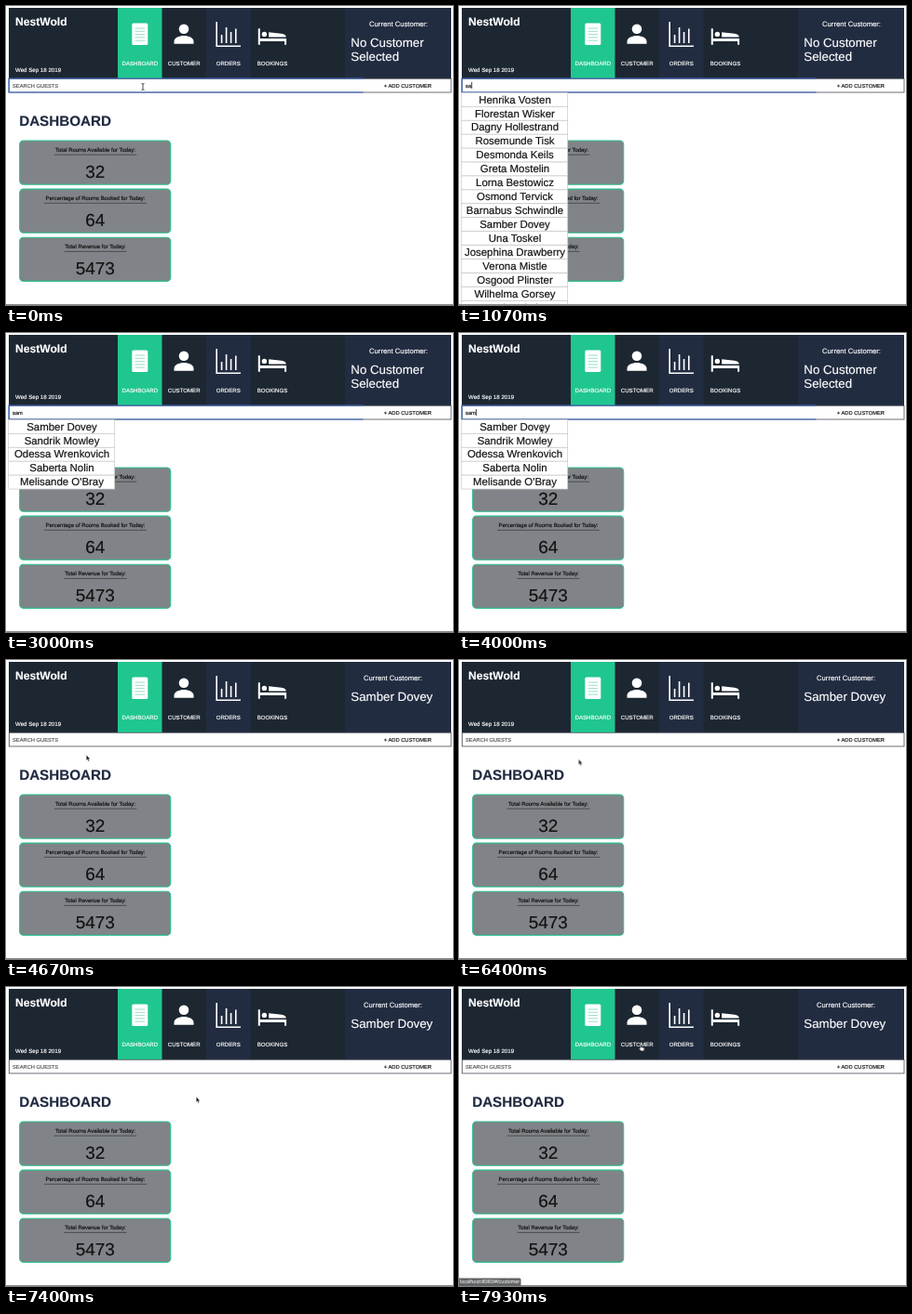
Recreate the animation shown at these times as an HTML page. Size 480 by 322 pixels, loop 8 s.

```html
<!DOCTYPE html>
<html lang="en">
<head>
<meta charset="utf-8">
<title>Hotel dashboard</title>
<style>
html, body { margin: 0; width: 100%; height: 100%; overflow: hidden; background: #fff; }
svg { display: block; width: 480px; height: 322px; color: #111; }
/* The thin stroke gives small type a slightly heavier weight */
text {
  font-family: "Liberation Sans", Arial, Helvetica, sans-serif;
  text-rendering: geometricPrecision;
  fill: currentColor; stroke: currentColor; stroke-width: .16px;
}
#header { color: #fff; }
.mid, .nav, .head, .row { text-anchor: middle; }
.nav { font-size: 6.1px; }
.field { font-size: 5.75px; }
.name { font-size: 13.3px; }
.head { font-size: 7.65px; }
.row { font-size: 11.45px; }

/* Hard switches */
.step { animation: 8s step-end infinite; }
.hint { animation-name: hint; color: #555; }
.ring { animation-name: ring; }
.t1 { animation-name: t1; }
.t2, .long { animation-name: t2; }
.t3, .short { animation-name: t3; }
.caret { animation-name: caret; }
.before { animation-name: before; }
.after { animation-name: after; }
.beam { animation-name: beam; }
.arrow { animation-name: arrow; }
.hand { animation-name: hand; }
.status { animation-name: status; color: #d4d4d4; }
@keyframes hint { 0% { opacity: 1 } 9.1% { opacity: 0 } 58.3%, 100% { opacity: 1 } }
@keyframes ring { 0% { opacity: 1 } 56.6%, 100% { opacity: 0 } }
@keyframes t1 { 0% { opacity: 0 } 9.1% { opacity: 1 } 13.3%, 100% { opacity: 0 } }
@keyframes t2 { 0% { opacity: 0 } 13.3% { opacity: 1 } 19.1%, 100% { opacity: 0 } }
@keyframes t3 { 0% { opacity: 0 } 19.1% { opacity: 1 } 58.3%, 100% { opacity: 0 } }
@keyframes caret {
  0% { opacity: 0; transform: translateX(7px) }
  3.35% { opacity: 1; transform: translateX(7px) }
  9.1% { opacity: 1; transform: translateX(10px) }
  13.3% { opacity: 1; transform: translateX(13.2px) }
  19.1% { opacity: 1; transform: translateX(17.9px) }
  24.95% { opacity: 0; transform: translateX(17.9px) }
  31.6% { opacity: 1; transform: translateX(17.9px) }
  37.45% { opacity: 0; transform: translateX(17.9px) }
  44.1% { opacity: 1; transform: translateX(17.9px) }
  50.3%, 100% { opacity: 0; transform: translateX(17.9px) }
}
@keyframes before { 0% { opacity: 1 } 58.3%, 100% { opacity: 0 } }
@keyframes after { 0% { opacity: 0 } 58.3%, 100% { opacity: 1 } }
@keyframes beam { 0% { opacity: 1 } 9.1% { opacity: 0 } 38.3% { opacity: 1 } 40.9%, 100% { opacity: 0 } }
@keyframes arrow { 0% { opacity: 0 } 40.9% { opacity: 1 } 95.8%, 100% { opacity: 0 } }
@keyframes hand { 0% { opacity: 0 } 95.8%, 100% { opacity: 1 } }
@keyframes status { 0% { opacity: 0 } 99.1%, 100% { opacity: 1 } }

.pointer { animation: travel 8s linear infinite; }
@keyframes travel {
  0%, 9.1% { transform: translate(147px, 87px) }
  38.3% { transform: translate(144px, 88px) }
  40.9% { transform: translate(132px, 93px) }
  44% { transform: translate(104px, 98px) }
  47.5% { transform: translate(88px, 100px) }
  52.5%, 61.2% { transform: translate(86px, 102px) }
  65% { transform: translate(112px, 105px) }
  69.1%, 74% { transform: translate(125px, 106px) }
  74.1%, 79.2% { transform: translate(125.6px, 106px) }
  80% { transform: translate(128px, 106.5px) }
  82.5% { transform: translate(170px, 124px) }
  85%, 88% { transform: translate(207px, 138px) }
  92.5% { transform: translate(204px, 118px) }
  95.8% { transform: translate(198px, 75px) }
  97.5%, 100% { transform: translate(194.5px, 62px) }
}
</style>
</head>
<body>
<svg viewBox="0 0 480 322">
  <rect width="480" height="322" fill="#fff"/>
  <g id="header">
    <rect x="3" y="2" width="475" height="76" fill="#1d2732"/>
    <rect x="120" y="2" width="47.5" height="76" fill="#20c68f"/>
    <rect x="215" y="2" width="47.5" height="76" fill="#222c41"/>
    <rect x="364" y="2" width="114" height="76" fill="#222c41"/>
    <text x="10" y="20.6" font-size="12.1" font-weight="700">NestWold</text>
    <text x="10" y="70.8" font-size="6.15">Wed Sep 18 2019</text>
    <text class="nav" x="143.8" y="64">DASHBOARD</text>
    <text class="nav" x="191.2" y="64">CUSTOMER</text>
    <text class="nav" x="238.7" y="64">ORDERS</text>
    <text class="nav" x="286" y="64">BOOKINGS</text>
    <g fill="#fff">
      <rect x="135.3" y="18.5" width="17" height="23.5" rx="1.6"/>
      <path d="M138.5 24h10.6M138.5 27.3h10.6M138.5 30.6h10.6M138.5 33.9h10.6M138.5 37.2h10.6" stroke="#8fdcc0" stroke-width=".9"/>
      <circle cx="191" cy="24.8" r="5.3"/>
      <path d="M180.5 40.7v-2.5c0-4 5.5-6.2 10.5-6.2s10.5 2.2 10.5 6.2v2.5z"/>
      <path d="M270.8 24.3h2v10.7h28.3v6.7h-2v-3.6h-26.3v3.6h-2z"/>
      <circle cx="277.4" cy="30.4" r="2.7"/>
      <path d="M282.2 28.2l13.5 1.6q5 .6 5 3.8h-18.500z"/>
    </g>
    <path d="M226.2 17v26.2H252M231.6 40V31M236.6 40V23M241.6 40V28M246.8 40V24.5" fill="none" stroke="#fff" stroke-width="1.6"/>
    <g class="step before">
      <text class="head" x="421.5" y="22.4">Current Customer:</text>
      <text class="name" x="370.3" y="44">No Customer</text>
      <text class="name" x="370.3" y="59">Selected</text>
    </g>
    <g class="step after">
      <text class="head" x="415.5" y="22.4">Current Customer:</text>
      <text class="name" x="370.3" y="44">Samber Dovey</text>
    </g>
  </g>

  <g id="search">
    <rect x="3.3" y="78.3" width="474.7" height="14.7" fill="#fff" stroke="#444b55" stroke-width=".8"/>
    <path class="step ring" d="M383.5 78H3V93H383.5" fill="none" stroke="#3a66c0" stroke-width="1.2"/>
    <text class="field step hint" x="7" y="87.5">SEARCH GUESTS</text>
    <text class="field step t1" x="7" y="87.5">s</text>
    <text class="field step t2" x="7" y="87.5">sa</text>
    <text class="field step t3" x="7" y="87.5">sam</text>
    <rect class="step caret" y="82" width=".8" height="7" fill="#111"/>
    <text class="field" x="405.8" y="87.5">+ ADD CUSTOMER</text>
  </g>

  <text x="14.2" y="128.6" font-size="15.2" font-weight="700" color="#1f2a40">DASHBOARD</text>
  <g id="cards"></g>
  <g id="long" class="step long"></g>
  <g id="short" class="step short"></g>

  <rect y="321" width="480" height="1" fill="#8a8a8a"/>
  <g class="step status">
    <rect x="-2" y="313.5" width="68.5" height="10" rx="1.5" fill="#626466"/>
    <text x="1" y="319.3" font-size="5.5">localhost:8080/#/customer</text>
  </g>

  <g class="pointer">
    <path class="step beam" d="M-1.5-3.5Q0-3.5 0-2.5Q0-3.5 1.5-3.5M0-2.5V2.5M-1.5 3.5Q0 3.5 0 2.5Q0 3.5 1.5 3.5" fill="none" stroke="#222" stroke-width=".8"/>
    <path class="step arrow" d="M.3.3V6.2L1.6 5 2.5 7.2 3.5 6.8 2.6 4.7H4.4Z" fill="#111" stroke="#fff" stroke-width=".4"/>
    <path class="step hand" d="M0 .6Q.7-.2 1.3.6V2.7L4 3.3Q4.7 3.5 4.5 4.5L4 7H.8L-1.3 4.3Q-1.1 3.5 0 4.2Z" fill="#fff" stroke="#111" stroke-width=".6"/>
  </g>
</svg>
<script>
const byId = id => document.getElementById(id);

const cards = [
  ["Total Rooms Available for Today:", 32, 44.3],
  ["Percentage of Rooms Booked for Today:", 64, 55],
  ["Total Revenue for Today:", 5473, 33.5],
];
byId("cards").innerHTML = cards.map(([label, value, half], i) => {
  const y = 145 + i * 52.1;
  return `<rect x="14.7" y="${y}" width="162" height="47.2" rx="4" fill="#808488" stroke="#2bc08d" stroke-width="1.1"/>
    <text class="mid" x="96" y="${y + 12}" font-size="5.95">${label}</text>
    <path d="M${96 - half} ${y + 15.2}h${half * 2}" stroke="#333" stroke-width=".7"/>
    <text class="mid" x="95.8" y="${y + 39.5}" font-size="18.9">${value}</text>`;
}).join("");

const pitch = 14.93;
function fillList(id, names) {
  byId(id).innerHTML = names.map((name, i) => {
    const y = 93.4 + i * pitch;
    return `<rect x="2.7" y="${y}" width="114" height="${pitch}" fill="#fff" stroke="#c6c6c6" stroke-width=".7"/>
      <text class="row" x="60" y="${y + 11.2}">${name}</text>`;
  }).join("");
}
fillList("long", [
  "Henrika Vosten", "Florestan Wisker", "Dagny Hollestrand", "Rosemunde Tisk",
  "Desmonda Keils", "Greta Mostelin", "Lorna Bestowicz", "Osmond Tervick",
  "Barnabus Schwindle", "Samber Dovey", "Una Toskel", "Josephina Drawberry",
  "Verona Mistle", "Osgood Plinster", "Wilhelma Gorsey", "Dorthy Skelm",
]);
fillList("short", [
  "Samber Dovey", "Sandrik Mowley", "Odessa Wrenkovich", "Saberta Nolin", "Melisande O'Bray",
]);
</script>
</body>
</html>
```
